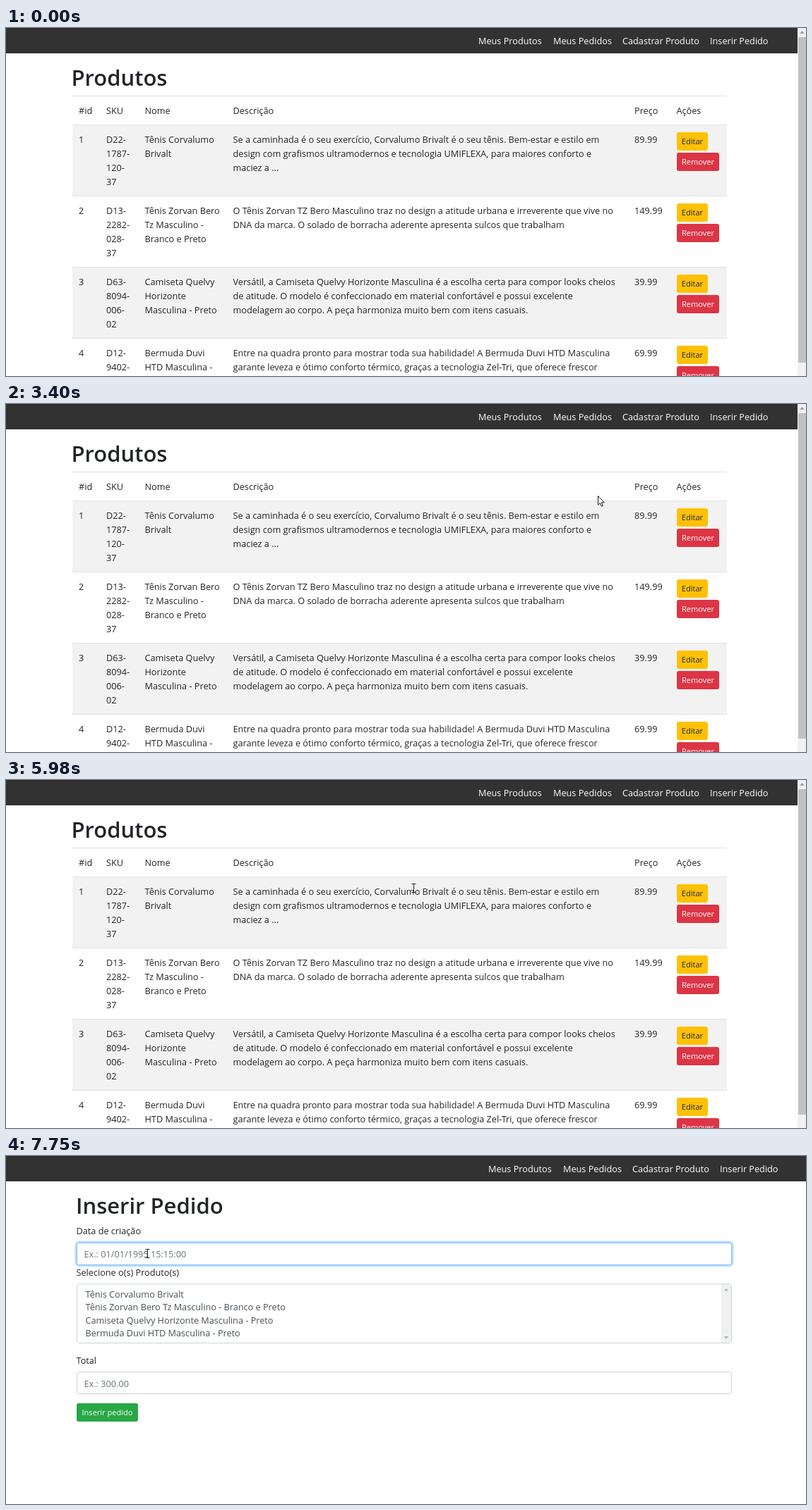
Write an HTML page that moves like this. It is 1133 px wide and 494 px high and loops after 8 s.

```html
<!DOCTYPE html>
<html lang="pt-BR">
<head>
<meta charset="utf-8">
<title>Produtos</title>
<style>
html, body { margin: 0; width: 100%; height: 100%; overflow: hidden; background: #fff; }
svg { display: block; width: 100vw; height: 100vh; }
text { font: 12.7px "Open Sans", "Noto Sans", sans-serif; fill: #212529; white-space: pre; }
text.title { font-size: 31px; font-weight: 600; }
text.btn { font-size: 11.05px; text-anchor: middle; }
text.light { fill: #fff; }
text.hint { fill: #6c757d; }
text.option { fill: #495057; }
</style>
</head>
<body>
<svg id="stage" viewBox="0 0 1133 494" xmlns="http://www.w3.org/2000/svg"></svg>
<script>
const NS = "http://www.w3.org/2000/svg";
const LOOP = 8000, PAGE_CHANGE = 6150, FOCUS = 7280, CARET_OFF = 7750;
const stage = document.getElementById("stage");

function add(parent, tag, attrs, content) {
  const el = document.createElementNS(NS, tag);
  for (const key in attrs) el.setAttribute(key, attrs[key]);
  if (content) el.textContent = content;
  parent.appendChild(el);
  return el;
}
const box = (p, x, y, width, height, fill, rx = 0) =>
  add(p, "rect", { x, y, width, height, fill, rx });
const label = (p, x, y, str, cls = "") => add(p, "text", { x, y, class: cls }, str);
const lines = (p, x, y, list) => list.forEach((s, i) => label(p, x, y + i * 20, s));
const show = (el, on) => el.setAttribute("visibility", on ? "visible" : "hidden");

function button(p, x, y, w, str, fill, cls) {
  box(p, x, y, w, 26, fill, 3);
  label(p, x + w / 2, y + 17, str, "btn " + cls);
}
function field(p, y, h) {
  return add(p, "rect", { x: 100.5, y: y + .5, width: 927, height: h, rx: 3.5, fill: "#fff", stroke: "#ced4da" });
}

const LINKS = [[670, 760, "Meus Produtos"], [776, 858, "Meus Pedidos"],
  [874, 982, "Cadastrar Produto"], [998, 1079, "Inserir Pedido"]];
function navbar(p, width, shift) {
  box(p, 0, 0, width, 36, "#323232");
  return LINKS.map(([x, , str]) => label(p, x + shift - 1, 22.5, str, "light"));
}

const ROWS = [
  { sku: ["D22-", "1787-", "120-", "37"], name: ["Tênis Corvalumo", "Brivalt"], price: "89.99",
    info: ["Se a caminhada é o seu exercício, Corvalumo Brivalt é o seu tênis. Bem-estar e estilo em",
      "design com grafismos ultramodernos e tecnologia UMIFLEXA, para maiores conforto e", "maciez a ..."] },
  { sku: ["D13-", "2282-", "028-", "37"], name: ["Tênis Zorvan Bero", "Tz Masculino -", "Branco e Preto"], price: "149.99",
    info: ["O Tênis Zorvan TZ Bero Masculino traz no design a atitude urbana e irreverente que vive no",
      "DNA da marca. O solado de borracha aderente apresenta sulcos que trabalham"] },
  { sku: ["D63-", "8094-", "006-", "02"], name: ["Camiseta Quelvy", "Horizonte", "Masculina - Preto"], price: "39.99",
    info: ["Versátil, a Camiseta Quelvy Horizonte Masculina é a escolha certa para compor looks cheios",
      "de atitude. O modelo é confeccionado em material confortável e possui excelente",
      "modelagem ao corpo. A peça harmoniza muito bem com itens casuais."] },
  { sku: ["D12-", "9402-"], name: ["Bermuda Duvi", "HTD Masculina -"], price: "69.99",
    info: ["Entre na quadra pronto para mostrar toda sua habilidade! A Bermuda Duvi HTD Masculina",
      "garante leveza e ótimo conforto térmico, graças a tecnologia Zel-Tri, que oferece frescor"] }
];
const COLS = [103, 142, 196.5, 321.5, 890, 949.5];

// Product list
const listPage = add(stage, "g", {});
const links = navbar(listPage, 1121, 0);
label(listPage, 92.5, 82, "Produtos", "title");
["#id", "SKU", "Nome", "Descrição", "Preço", "Ações"].forEach((s, i) => label(listPage, COLS[i], 122, s));
box(listPage, 94, 96, 927, 1, "#dee2e6");
ROWS.forEach((row, i) => {
  const y = 137 + i * 101;
  if (i % 2 === 0) box(listPage, 94, y, 927, 101, "#f2f2f2");
  box(listPage, 94, y, 927, 1, "#dee2e6");
  [[String(i + 1)], row.sku, row.name, row.info, [row.price]]
    .forEach((cell, c) => lines(listPage, COLS[c], y + 26, cell));
  button(listPage, 950, y + 11, 44, "Editar", "#ffc107", "");
  button(listPage, 950, y + 40, 60, "Remover", "#dc3545", "light");
});
box(listPage, 1121, 0, 12, 494, "#f1f1f1");
box(listPage, 1122, 13, 11, 462, "#c1c1c1");
add(listPage, "path", { d: "M1124 8h7l-3.5-4z", fill: "#a3a3a3" });

// Order form
const formPage = add(stage, "g", {});
box(formPage, 0, 0, 1133, 494, "#fff");
navbar(formPage, 1133, 14);
label(formPage, 99, 82, "Inserir Pedido", "title");
label(formPage, 99.5, 111, "Data de criação");
const ring = add(formPage, "rect", { x: 98.8, y: 121.8, width: 930.4, height: 34, rx: 5,
  fill: "none", stroke: "#007bff", "stroke-width": 2.6 });
const dateField = field(formPage, 123, 31);
label(formPage, 110.5, 144, "Ex.: 01/01/1995 15:15:00", "hint");
const caret = box(formPage, 111, 130, 1, 18, "#495057");
label(formPage, 99.5, 169.5, "Selecione o(s) Produto(s)");
field(formPage, 181, 84);
["Tênis Corvalumo Brivalt", "Tênis Zorvan Bero Tz Masculino - Branco e Preto",
  "Camiseta Quelvy Horizonte Masculina - Preto", "Bermuda Duvi HTD Masculina - Preto"]
  .forEach((s, i) => label(formPage, 112.5, 201 + i * 18.4, s, "option"));
box(formPage, 1013, 182, 14, 83, "#f0f0f0");
add(formPage, "path", { d: "M1017 191.500h6l-3-3.500zM1017 256h6l-3 3.500z", fill: "#8db5d3" });
label(formPage, 99.5, 294.5, "Total");
field(formPage, 306, 31);
label(formPage, 110.5, 328, "Ex.: 300.00", "hint");
button(formPage, 100, 351, 87, "Inserir pedido", "#28a745", "light");

// Pointer
const spot = add(stage, "circle", { r: 10, fill: "#ffee00", "fill-opacity": .58 });
const pointer = add(stage, "g", {});
const shape = d => add(pointer, "path", { d, fill: "#fff", stroke: "#000", "stroke-width": .9, "stroke-linejoin": "round" });
const cursors = {
  arrow: shape("M.5.5V13.2L3.4 10.6 5.4 15.3 7.4 14.5 5.4 9.9H9.3Z"),
  hand: shape("M-2 1.5Q-2 0-.5 0T1 1.500V6.500Q3 5.500 4 7 6 6.300 6.500 8 8.500 7.500 8.500 10V13Q8 15 7 18H-1Q-2.500 15-5.500 11-6 8.500-3.500 9.500L-2 11Z"),
  beam: add(pointer, "path", { d: "M-3-6H3M0-6V6M-3 6H3", fill: "none", stroke: "#222", transform: "translate(.5 .5)" })
};

// Each move: start, end, number of steps, [step, x, y] waypoints
const MOVES = [
  [820, 1610, 11, [[0, 1064, 469], [3, 1034, 280], [5, 958, 130], [7, 904, 59], [10, 906, 11]]],
  [1930, 2080, 3, [[0, 908, 14], [2, 917, 19]]],
  [2230, 3010, 11, [[0, 880, 45], [4, 689, 131], [7, 610, 194], [10, 556, 245]]],
  [3090, 3400, 5, [[0, 504, 321], [1, 546, 294], [3, 770, 165], [4, 838, 130]]],
  [3630, 4020, 6, [[0, 862, 118], [3, 1000, 44], [5, 1040, 18]]],
  [5590, 5980, 6, [[0, 1000, 42], [3, 670, 150], [4, 600, 160], [5, 577, 153]]],
  [6440, 7210, 11, [[0, 560, 152], [4, 260, 134], [7, 115, 124], [8, 124, 128], [10, 200, 138]]]
];

function position(t) {
  const move = MOVES.filter(m => t >= m[0]).pop();
  if (!move) return null;
  const [start, end, count, points] = move;
  const k = Math.min(count - 1, Math.floor((t - start) / (end - start) * (count - 1) + .1));
  const next = points.findIndex(p => p[0] >= k);
  const b = points[next], a = points[Math.max(0, next - 1)];
  const f = b === a ? 0 : (k - a[0]) / (b[0] - a[0]);
  return [1, 2].map(i => Math.round(a[i] + (b[i] - a[i]) * f));
}

function overText(x, y) {
  return ROWS.some((row, i) => {
    const top = 149 + i * 101;
    return x > 322 && x < 862 && y > top && y < top + row.info.length * 20;
  });
}

function render(t) {
  const form = t >= PAGE_CHANGE, pos = position(t);
  show(listPage, !form);
  show(formPage, form);

  let hovered = -1;
  if (pos) {
    const [x, y] = pos;
    if (!form && y < 34) hovered = LINKS.findIndex(l => x >= l[0] && x <= l[1]);
    const kind = hovered >= 0 ? "hand" : form || overText(x, y) ? "beam" : "arrow";
    for (const name in cursors) cursors[name].style.display = name === kind ? "" : "none";
    pointer.setAttribute("transform", `translate(${x} ${y})`);
    spot.setAttribute("cx", x - 1.5);
    spot.setAttribute("cy", y - 1);
  }
  show(pointer, !!pos);
  show(spot, [5050, FOCUS].some(c => t >= c && t < c + 80));
  links.forEach((el, i) => el.setAttribute("text-decoration", i === hovered ? "underline" : "none"));

  const focus = t < FOCUS ? 0 : t < FOCUS + 80 ? .5 : 1;
  ring.setAttribute("stroke-opacity", focus * .27);
  dateField.setAttribute("stroke", ["#ced4da", "#a7c9ed", "#80bdff"][focus * 2]);
  show(caret, t >= FOCUS && t < CARET_OFF);
}

const origin = performance.now();
function tick() {
  render((performance.now() - origin) % LOOP);
  requestAnimationFrame(tick);
}
tick();
</script>
</body>
</html>
```
